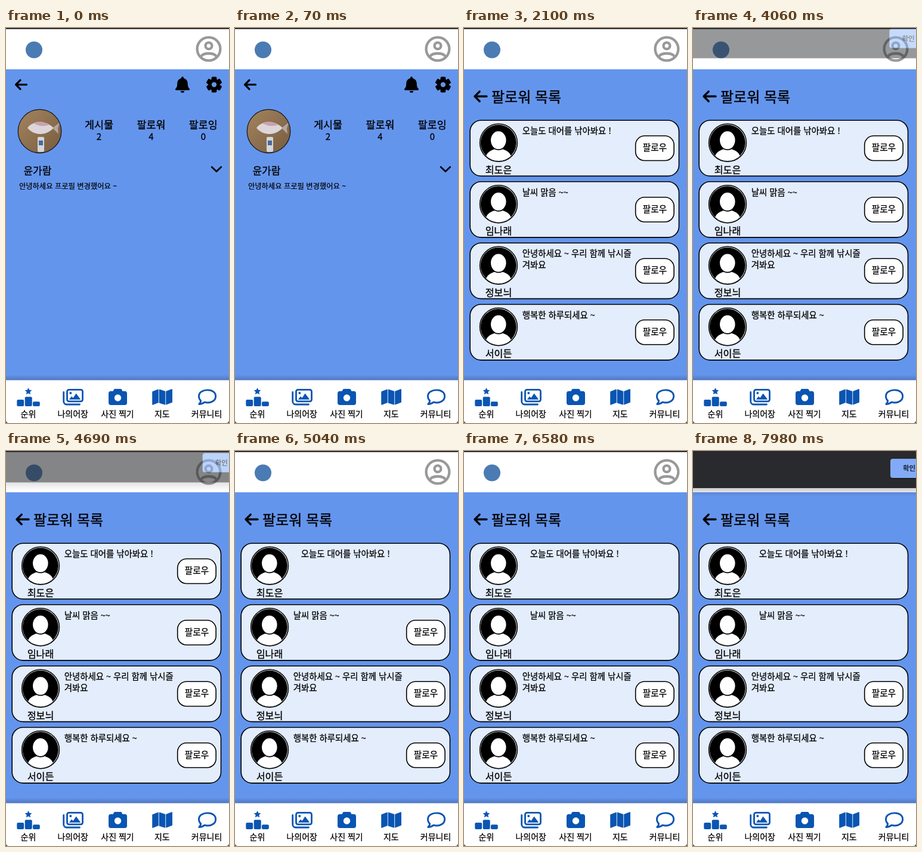
Write an HTML page that moves like this. It is 374x660 px and loops after 8000 ms.

```html
<!DOCTYPE html>
<html lang="ko">
<head>
<meta charset="utf-8">
<title>팔로워 목록</title>
<style>
  html, body { margin: 0; width: 100%; height: 100%; overflow: hidden; background: #fff; }
  svg { display: block; width: 374px; height: 660px; }
  text { font-family: "Noto Sans CJK KR", "Noto Sans CJK", "Noto Sans CJK JP", sans-serif; font-weight: 500; fill: #000; stroke: #000; stroke-width: 0.018em; white-space: pre; }
  .mid { text-anchor: middle; }
  .line { fill: none; stroke-linecap: round; stroke-linejoin: round; }
</style>
</head>
<body>
<svg id="stage" viewBox="0 0 374 660"></svg>
<script>
const LOOP = 8000;
const BLUE = '#0a55b2';

const text = (x, y, size, str, cls = '') =>
  `<text class="${cls}" x="${x}" y="${y}" font-size="${size}">${str}</text>`;
const mid = (x, y, size, str) => text(x, y, size, str, 'mid');
const line = (d, width, color = '#000') =>
  `<path class="line" d="${d}" stroke="${color}" stroke-width="${width}"/>`;
const rect = (x, y, w, h, fill, rx = 0, more = '') =>
  `<rect x="${x}" y="${y}" width="${w}" height="${h}" rx="${rx}" fill="${fill}" ${more}/>`;
const circle = (x, y, r, fill, more = '') =>
  `<circle cx="${x}" cy="${y}" r="${r}" fill="${fill}" ${more}/>`;
const arrow = (x, y, w, h, width) =>
  line(`M${x + w} ${y}H${x}M${x + h} ${y - h}L${x} ${y}L${x + h} ${y + h}`, width);

function star(cx, cy, r) {
  const pts = Array.from({ length: 10 }, (_, i) => {
    const a = i * Math.PI / 5, d = i % 2 ? r * 0.48 : r;
    return `${(cx + d * Math.sin(a)).toFixed(2)},${(cy - d * Math.cos(a)).toFixed(2)}`;
  });
  return `<polygon points="${pts.join(' ')}" fill="${BLUE}"/>`;
}

const grey = 'stroke="#999" stroke-width="4.3"';
const userIcon = circle(340, 35, 19.4, 'none', grey) + circle(340, 29.7, 5.4, 'none', grey) +
  line('M327.5 47.2C331 40.9 349 40.9 352.5 47.2', 4.3, '#999');

const navIcons =
  star(37.5, 607.2, 6.2) +
  rect(18.3, 621, 11.8, 11, BLUE, 2) + rect(31.7, 616.3, 12, 15.7, BLUE, 2) + rect(45, 624.3, 11.8, 7.7, BLUE, 2) +
  rect(102.5, 604.4, 26, 19.4, 'none', 3, `stroke="${BLUE}" stroke-width="2.8"`) +
  line('M96.7 608.5V624a5 5 0 0 0 5 5H123.5', 2.8, BLUE) +
  circle(108.3, 610, 2, BLUE) +
  `<path d="M105.8 620.8L110 615.5L112.6 618L117.6 610.4L125.2 620.8Z" fill="${BLUE}"/>` +
  `<path d="M176 606.8H179.6L180.8 604.3Q181.4 603 183 603H192Q193.6 603 194.2 604.3L195.4 606.8H199Q203 606.8 203 610.8V626Q203 630 199 630H176Q172 630 172 626V610.8Q172 606.8 176 606.8Z" fill="${BLUE}"/>` +
  circle(187.5, 618, 5.7, '#fff') +
  `<path d="M246 608L255 604.6V625.4L246 629ZM257.5 604.6L266.5 607.4V628.8L257.5 626ZM269 607.6L278.2 604V625L269 628.6Z" fill="${BLUE}" stroke="${BLUE}" stroke-width="1.6" stroke-linejoin="round"/>` +
  line('M326.6 622.6C321.8 617.8 322.8 610.5 328 607.5C334 603.8 343 604 348 607.8C353.2 611.8 352.8 619.6 347.5 623.2C343.4 626 337.6 626.6 333 625.2C330.4 627.4 327 628.6 323.8 628.6C325.4 627 326.8 625 326.6 622.6Z', 2.9, BLUE);

const navLabels = ['순위', '나의어장', '사진 찍기', '지도', '커뮤니티']
  .map((s, i) => mid(37.4 + 74.8 * i, 650.4, 14, s)).join('');

// profile page
const bell = `<path d="M296 81.2Q298 81.2 298 83.2V84C302.6 85 304.8 88.6 304.8 93C304.8 97.6 305.8 99.6 307.8 101.6Q308.6 104 306.4 104H285.6Q283.4 104 284.2 101.6C286.2 99.6 287.2 97.6 287.2 93C287.2 88.6 289.4 85 294 84V83.2Q294 81.2 296 81.2ZM292.6 105.3H299.4Q298.8 108.2 296 108.2Q293.2 108.2 292.6 105.3Z"/>`;
const gear = [0, 60, 120].map(a => rect(344.6, 81.4, 8.8, 26.4, '#000', 2, `transform="rotate(${a} 349 94.6)"`)).join('') +
  circle(349, 94.6, 9.8, '#000') + circle(349, 94.6, 4.2, '#6495ed');
const photo = `<g clip-path="url(#round)">` + rect(19, 135, 75, 75, 'url(#wood)') +
  `<path d="M36 167C44 155 66 153 80 167C68 180 48 181 36 167Z" fill="#dcd6da"/>
   <path d="M78 167L90 158L87 168L88 177Z" fill="#b5a5a0"/>
   <path d="M46 159C54 155 64 156 72 162C62 165 54 164 46 159Z" fill="#c9a3b0"/>` +
  rect(53, 182, 11, 25, '#d4d6da', 2) + rect(55, 188, 7, 8, '#4a6a9c') +
  `</g>` + circle(56.5, 172.5, 36.3, 'none', 'stroke="#111" stroke-width="1.2"');
const stats = [['게시물', 2], ['팔로워', 4], ['팔로잉', 0]]
  .map(([s, n], i) => mid(156 + 87.4 * i, 167.6, 17.4, s) + mid(156 + 87.4 * i, 187.2, 15, n)).join('');
const profile = arrow(16.5, 94.7, 18, 7.5, 3.2) + bell + gear + photo + stats +
  text(29.4, 245.2, 17, '윤가람') + text(21.9, 268.6, 12.3, '안녕하세요 프로필 변경했어요 ~') +
  line('M345.2 232.2L353 239.8L360.8 232.2', 2.7);

// follower list
const people = [
  ['최도은', ['오늘도 대어를 낚아봐요 !']],
  ['임나래', ['날씨 맑음 ~~']],
  ['정보늬', ['안녕하세요 ~ 우리 함께 낚시즐', '겨봐요']],
  ['서이든', ['행복한 하루되세요 ~']],
];
const edge = 'stroke="#000" stroke-width="1.6"';
const avatar = circle(57.8, 191.8, 30, '#000') +
  `<ellipse cx="57.8" cy="187.6" rx="12.8" ry="15" fill="#fff"/>
   <path d="M37.2 213.6C40 206.5 46 204.5 51 202.6Q58 206 65 202.6C70 204.5 76 206.5 78.6 213.6A30 30 0 0 1 37.2 213.6Z" fill="#fff"/>`;
const card = ([name, lines], i) => `<g transform="translate(0 ${102.5 * i})">` +
  rect(10.2, 154.2, 350.3, 93.2, '#e3edfc', 18.5, edge) +
  circle(58, 191.7, 31.4, '#fff', edge) +
  `<g class="face">${avatar}</g>` + mid(58, 242.6, 16.2, name) +
  `<g class="note">${lines.map((s, k) => text(97.8, 177.4 + 18.5 * k, 14.4, s)).join('')}</g>` +
  `<g class="follow">${rect(287.7, 180.3, 64.5, 41.2, '#fff', 15, edge)}${mid(320, 205.2, 14.6, '팔로우')}</g></g>`;

const dialog =
  rect(-20, 62, 420, 14, 'url(#under)', 0, 'id="shade"') +
  rect(-20, -60, 420, 122, '#282a2d') +
  rect(331, 17, 60, 30, '#1c1d20', 4, 'id="glow"') +
  rect(331, 13, 60, 32, '#8ab4f8', 4, 'id="ok"') +
  text(352, 33, 11.5, '확인');

const grad = (id, a, b, vertical = true) =>
  `<linearGradient id="${id}" x1="0" y1="0" x2="${vertical ? 0 : 1}" y2="1">
   <stop offset="0" ${a}/><stop offset="1" ${b}/></linearGradient>`;
const shadeStop = o => `stop-color="#000" stop-opacity="${o}"`;

document.getElementById('stage').innerHTML = `<defs>
  ${grad('under', shadeStop(0.2), shadeStop(0))}
  ${grad('navShade', shadeStop(0), shadeStop(0.2))}
  ${grad('wood', 'stop-color="#a58560"', 'stop-color="#755b3e"', false)}
  <clipPath id="round">${circle(56.5, 172.5, 36.3, '#000')}</clipPath></defs>` +
  rect(0, 0, 374, 660, '#6495ed') + rect(0, 0, 374, 69, '#fff') + rect(0, 0, 374, 1.8, '#1f1f21') +
  circle(47, 36.5, 14, '#4a7bb3') +
  `<g class="icon">${userIcon}</g>
  <g id="profile">${profile}</g>
  <g id="list"><g class="icon">${arrow(18, 114.3, 20, 8.2, 3.4)}</g>
    <g id="title">${text(46, 123.6, 24, '팔로워 목록')}</g>${people.map(card).join('')}</g>` +
  rect(0, 579, 374, 9.5, 'url(#navShade)') + rect(0, 588.5, 374, 71.5, '#fff') +
  `<g class="icon">${navIcons}</g>${navLabels}
  <path d="M0 655Q0 660 5 660H0ZM374 655Q374 660 369 660H374Z" fill="#444"/>
  <g id="dialog">${dialog}</g>`;

const $ = id => document.getElementById(id);
const all = cls => [...document.getElementsByClassName(cls)];
const icons = all('icon'), faces = all('face'), notes = all('note'), follows = all('follow');
const show = (el, on) => el.setAttribute('visibility', on ? 'inherit' : 'hidden');

// [time, dialog opacity, shadow, button pressed]
const steps = [
  [0, 0, 0, 0],
  [4060, 0.48, 0, 0], [4130, 0.9, 0.7, 0], [4200, 1, 1, 0],
  [4480, 1, 1, 1], [4550, 1, 1, 0], [4620, 0.85, 1, 0], [4690, 0.57, 1, 0],
  [4760, 0.25, 1, 0], [4830, 0.06, 1, 0], [4900, 0, 0, 0],
  [5740, 0.48, 0, 0], [5810, 0.9, 0.7, 0], [5880, 1, 1, 0],
  [6090, 1, 1, 1], [6160, 1, 1, 0], [6230, 0.85, 1, 0], [6300, 0.57, 1, 0],
  [6370, 0.25, 1, 0], [6440, 0.06, 1, 0], [6510, 0, 0, 0],
  [7490, 0.7, 0.6, 0], [7560, 1, 1, 0], [7910, 1, 1, 1],
];
const followAt = [5040, 6580, Infinity, Infinity];
const faceAt = [0, 2030, 2030, 2100];

function draw(t) {
  const inList = t >= 1960;
  const loading = inList && t < 2030;
  show($('profile'), !inList);
  show($('list'), inList);
  icons.forEach(el => show(el, !loading));
  show(icons[1], inList && !loading);
  $('title').setAttribute('transform', `translate(${loading ? -23 : 0} 0)`);
  followAt.forEach((at, i) => {
    const done = t >= at;
    show(follows[i], inList && !done);
    show(faces[i], inList && t >= faceAt[i]);
    notes[i].setAttribute('transform', `translate(${done ? 13 : 0} 0)`);
  });

  const [, alpha, shade, pressed] = steps.filter(s => s[0] <= t).pop();
  const away = 1 - alpha;
  $('dialog').setAttribute('opacity', alpha);
  $('dialog').setAttribute('transform', `translate(${-3 * away} ${-22 * away})`);
  $('shade').setAttribute('opacity', shade);
  $('ok').setAttribute('fill', pressed ? '#82aaf6' : '#8ab4f8');
  show($('glow'), pressed);
}

function tick() {
  draw(performance.now() % LOOP);
  requestAnimationFrame(tick);
}
tick();
</script>
</body>
</html>
```
